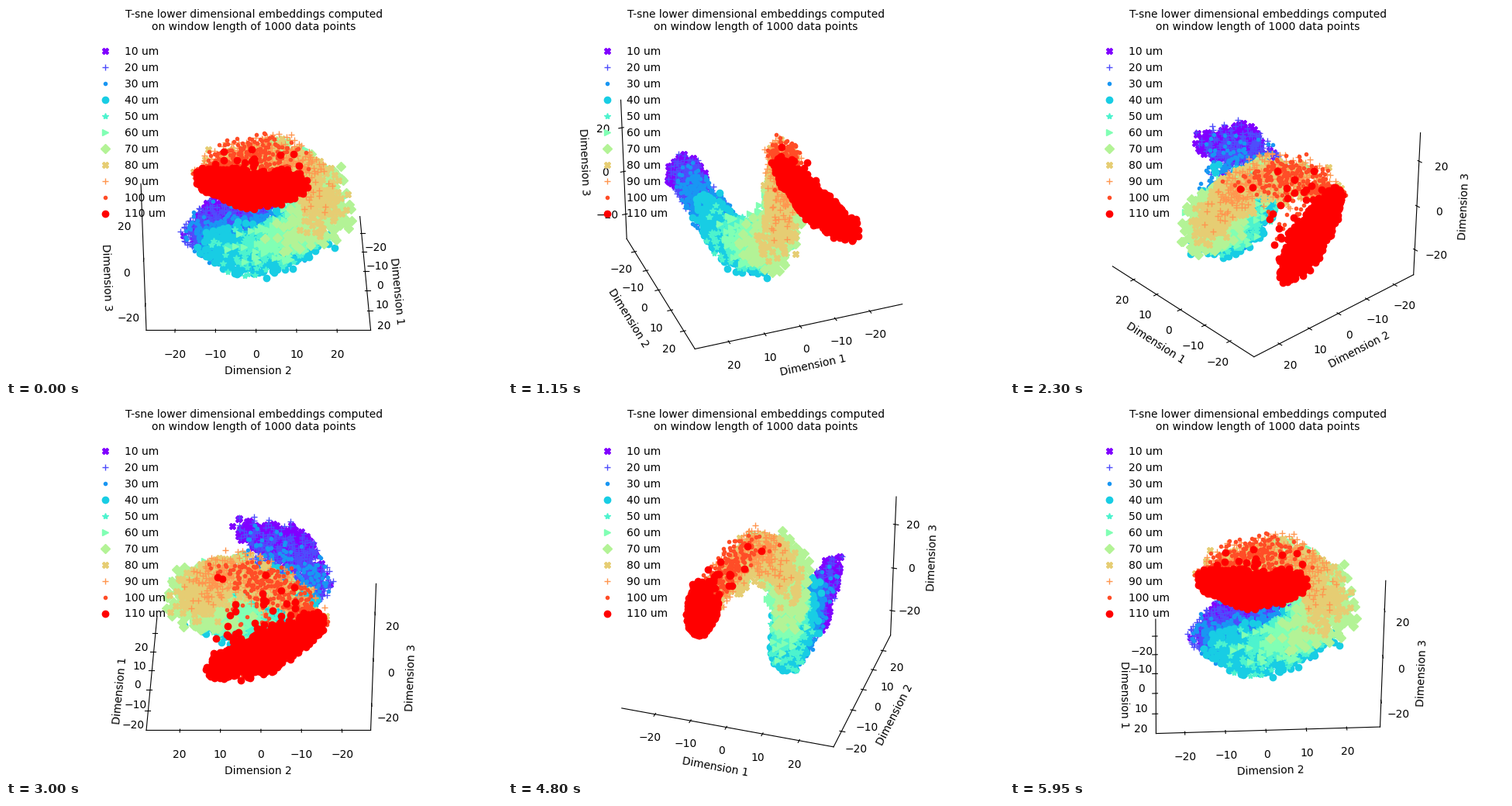
These frames come from a looping animation (640 by 480 pixels, 6000 ms). A matplotlib script:

```python
import numpy as np
import matplotlib.pyplot as plt
from matplotlib.animation import FuncAnimation

FRAMES, INTERVAL = 120, 50
UNIT = np.array([4.78, 5.08, 3.285])   # layout units per data unit
MID = np.array([-0.1, 0.6, 0.3])       # centre of the data box
MARKERS = "X+.o*>DX+.o"
COUNTS = [500, 600, 750, 600, 500, 500, 420, 480, 280, 260, 900]

# The cloud is one bent sheet. Each key class is a strand across it,
# given by its start, middle and end; the others lie in between.
STRANDS = {
    0: [(96, -62, 22), (88, -35, 40), (92, 26, 58)],
    1: [(62, -88, -14), (74, -55, 5), (86, 0, 46)],
    3: [(46, -48, -42), (38, 5, -60), (30, 92, -38)],
    6: [(18, 62, -38), (8, 95, 10), (-25, 15, 68)],
    8: [(-5, 85, 38), (-28, 5, 56), (-56, -76, 8)],
    9: [(-30, 25, 56), (-42, -30, 46), (-60, -78, 4)],
    10: [(-108, 58, -35), (-80, -12, -30), (-57, -74, 4)],
}
KEYS = list(STRANDS)
COORDS = np.array([np.ravel(p) for p in STRANDS.values()], float).T

rng = np.random.default_rng(7)


def in_ball(n):
    d = rng.normal(size=(n, 3))
    d /= np.linalg.norm(d, axis=1, keepdims=True)
    return d * rng.random((n, 1)) ** (1 / 3)


def cloud(k, n):
    """n data points around strand k, with some straying to its neighbours."""
    t = rng.random(n)
    stray = 0.45 * (1 - 0.78 * (k / 10) ** 4) * rng.standard_t(2, n)
    s = np.clip(k + np.clip(stray, -1.4, 1.4), 0, 10)
    pts = np.array([np.interp(s, KEYS, c) for c in COORDS]).reshape(3, 3, n)
    weights = np.array([(1 - t) * (1 - 2 * t), 4 * t * (1 - t), t * (2 * t - 1)])
    spine = np.einsum("pn,pcn->nc", weights, pts)
    radius = (21 + 9 * np.sin(np.pi * k / 10)) * (0.6 + 0.5 * np.sin(np.pi * t))
    pos = spine + in_ball(n) * radius[:, None] * [0.85, 1, 1.2]
    return (pos / UNIT + MID).T


fig = plt.figure(figsize=(6.4, 4.8), dpi=100)
side = 436.8
ax = fig.add_axes([101.5 / 640, 3.7 / 480, side / 640, side / 480],
                  projection="3d")
for k, (marker, n) in enumerate(zip(MARKERS, COUNTS)):
    ax.plot(*cloud(k, n), marker, color=plt.cm.rainbow(k / 10),
            label=f"{10 * (k + 1)} um")

ax.set(xlim=(-29.5, 29.3), ylim=(-27.1, 28.3), zlim=(-31.8, 32.4),
       xticks=range(-20, 21, 10), yticks=range(-20, 21, 10),
       zticks=[-20, 0, 20], xlabel="Dimension 1", ylabel="Dimension 2",
       zlabel="Dimension 3")
ax.grid(False)
for axis in (ax.xaxis, ax.yaxis, ax.zaxis):
    axis.pane.set_visible(False)
fig.text(0.5, 1 - 4 / 480, "T-sne lower dimensional embeddings computed\n"
         "on window length of 1000 data points", ha="center", va="top")
ax.legend(loc="upper left", frameon=False)


def update(i):
    # a hair off the right angles, so the axis sides are well defined
    ax.view_init(elev=30, azim=max(360 * i / FRAMES - 1e-3, 1e-3))
    return ()


anim = FuncAnimation(fig, update, frames=FRAMES, interval=INTERVAL,
                     init_func=lambda: update(0), repeat=True, repeat_delay=0)
plt.show()
```
